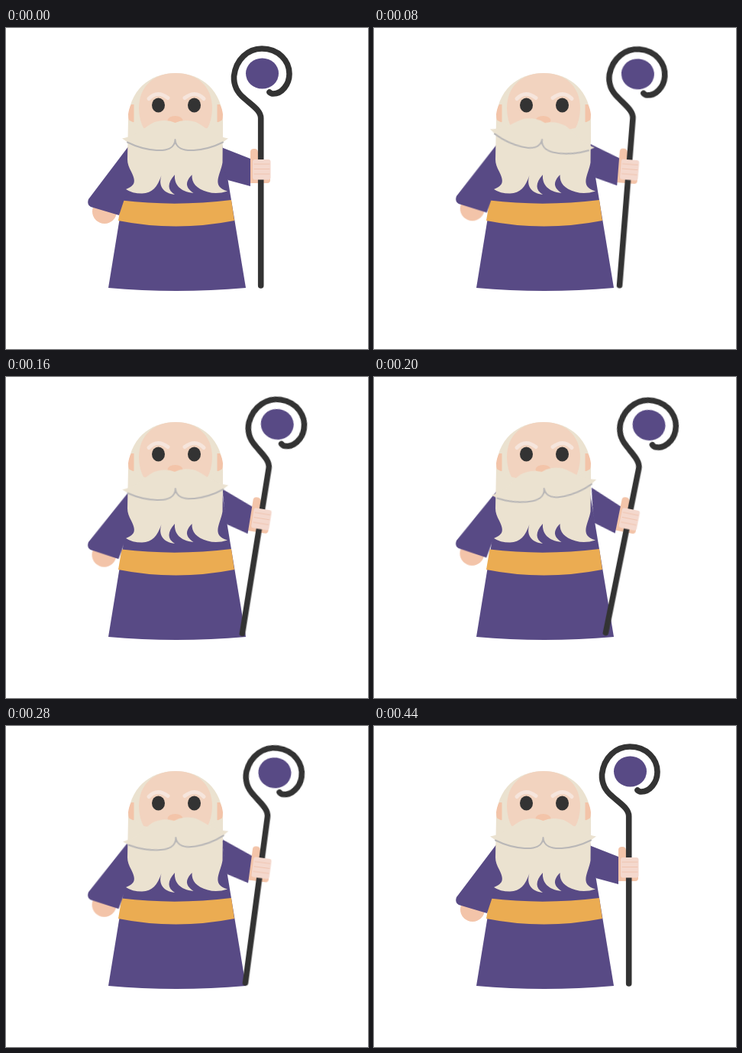
These frames come from a looping animation (474 by 420 pixels, 480 ms). An HTML page without scripts:

```html
<!DOCTYPE html>
<html lang="en">
<head>
<meta charset="utf-8">
<title>Wizard</title>
<style>
  html, body { margin: 0; width: 100%; height: 100%; overflow: hidden; background: #fff; }
  svg { display: block; width: 474px; height: 420px; }

  .robe { fill: #584a85; }
  .belt { fill: #ebac52; }
  .hair { fill: #ebe2d0; }
  .face { fill: #f2d3bf; }
  .skin { fill: #f3c4a9; }
  .fist { fill: #f4d8cd; }
  .dark { fill: #333; }
  .line { fill: none; stroke-linecap: round; stroke-linejoin: round; }
  .staff { stroke: #333; stroke-width: 7.6; }
  .brow { stroke: #f6e5dc; stroke-width: 5; }
  .knuckle { stroke: #efc4b0; stroke-width: 1; }
  .lip { stroke: #b9b7b7; stroke-width: 2; }

  /* Motion advances in 40 ms ticks, twelve per loop */
  .staff-arm { transform-origin: 330.5px 184px; animation: swing 480ms infinite; }
  .free-arm { transform-origin: 108px 224px; animation: lift 480ms infinite; }
  .moustache { transform-origin: 221.5px 138px; animation: twitch 480ms infinite; }

  @keyframes swing {
    0% { transform: rotate(0deg); animation-timing-function: steps(5); }
    41.6667% { transform: rotate(11.4deg); animation-timing-function: steps(6); }
    91.6667%, 100% { transform: rotate(0deg); }
  }
  @keyframes lift {
    0% { transform: translateY(0) rotate(0deg); animation-timing-function: steps(5); }
    41.6667% { transform: translateY(-10px) rotate(2deg); animation-timing-function: steps(6); }
    91.6667%, 100% { transform: translateY(0) rotate(0deg); }
  }
  @keyframes twitch {
    0% { transform: rotate(0deg); animation-timing-function: steps(2); }
    16.6667% { transform: rotate(10deg); animation-timing-function: steps(3); }
    41.6667% { transform: rotate(-8.5deg); animation-timing-function: steps(6); }
    91.6667%, 100% { transform: rotate(0deg); }
  }
</style>
</head>
<body>
<svg viewBox="0 0 474 420">
  <!-- Robe -->
  <path class="robe" d="M165 150H282.5L314 340Q222 348 134 340Z"/>
  <path class="belt" d="M151.500 225.500Q222 234 295 225L299 252Q222 267 147 252Z"/>

  <g class="free-arm">
    <circle class="skin" cx="129" cy="240" r="16"/>
    <path class="robe" d="M164 150L108 224Q105.500 231 111 234L148 245L156 221L190 190V150Z"/>
  </g>

  <g class="staff-arm">
    <path class="robe" d="M278 154.500L320 171V207L290.500 199L286.500 188Z"/>
    <path class="skin" d="M320 203V162Q320 158 325 158Q330 158 330 163V185H346V199Q346 203 342 203Z"/>
    <path class="line staff" d="M333.700 337V118C333.700 108 322 101 312 92C302 84 298 74 298.500 63C301 41 317 27 335 27C357 27 371 43 371 60C371 74 361 86 350 86Q347 86 345 84"/>
    <ellipse class="robe" cx="335.500" cy="59.500" rx="21.500" ry="20"/>
    <rect class="fist" x="323" y="172" width="23.500" height="26.500" rx="3"/>
    <path class="line knuckle" d="M325 178H345M325 184.500H345M325 191H345"/>
  </g>

  <!-- Head -->
  <path class="hair" d="M160 150V122C160 82 188 59 222 59C256 59 284 82 284 122V150Z"/>
  <path class="skin" d="M164 100H167.500V123Q160 126 160 113Q161 105 164 100ZM280 100H276.500V123Q284 126 284 113Q283 105 280 100Z"/>
  <path class="face" d="M174 105C174 76 194 59 222 59C250 59 270 76 270 105Q270 120 263 133L222 150L181 133Q174 120 174 105Z"/>
  <ellipse class="skin" cx="221.500" cy="121" rx="10" ry="6"/>
  <ellipse class="dark" cx="199.500" cy="101" rx="8.500" ry="9.500"/>
  <ellipse class="dark" cx="246.500" cy="101" rx="8.500" ry="9.500"/>
  <path class="line brow" d="M187 92.500Q198 81 212 91.500M259 92.500Q248 81 234 91.500"/>

  <!-- Beard -->
  <path class="hair" d="M160 120L181 131L222 140L263 131L284 120L283.500 176C281 192 268 207 290 213.500Q276 218 264 214.500C249 210 243 203 243.500 192C235 201 234 208 245.500 216C228 214 220 205 221 192C211 203 211 212 221 218C206 216 199 207 203.500 193C198 208 192 216 178 216.500Q165 216.500 157 211C170 206 170 200 164 188Q159 179 159 172Z"/>

  <g class="moustache">
    <path class="hair" d="M221.500 124Q211 119 199 122C185 124 178 140 152 144.500Q156 147 159 149.500C178 159 221 169 221.500 146C222 169 265 159 284 149.500Q287 147 291 144.500C265 140 258 124 244 122Q232 119 221.500 124Z"/>
    <path class="line lip" d="M159 149.500C178 159 221 169 221.500 146C222 169 265 159 284 149.500"/>
  </g>
</svg>
</body>
</html>
```
